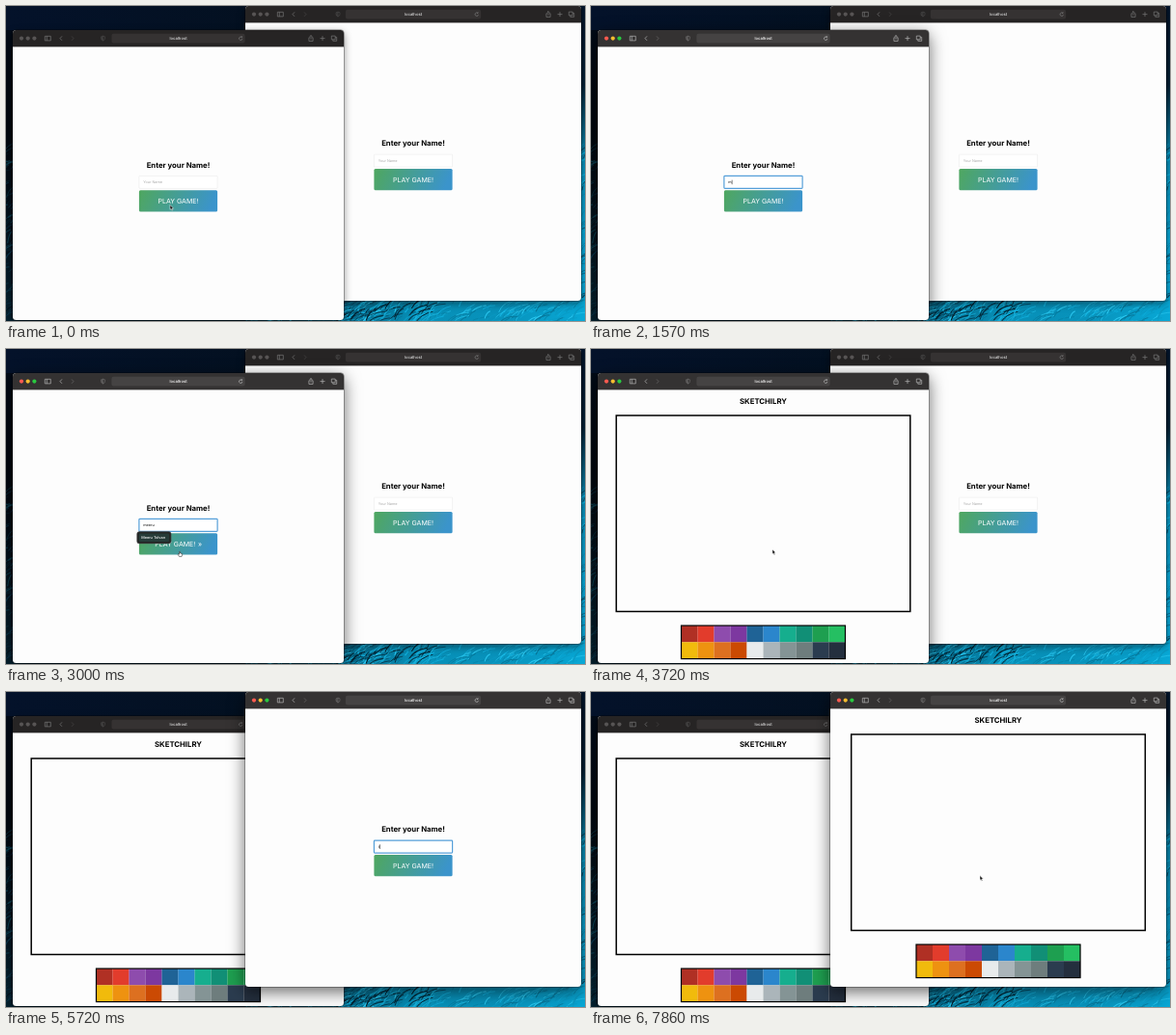
Recreate the animation shown at these times as an HTML page with a canvas. Size 600 by 327 pixels, loop 8000 ms.

```html
<!DOCTYPE html>
<html lang="en">
<head>
<meta charset="utf-8">
<title>Two player drawing game</title>
<style>
html, body { margin: 0; width: 100%; height: 100%; overflow: hidden; background: #020a1a; }
canvas, .cursor { position: absolute; left: 0; top: 0; }
.window {
  --bar: #262424; --field: #353232; --icon: #777; --title: #ddd;
  position: absolute; border-radius: 3.5px; background: #fdfdfd;
  box-shadow: 0 0 0 .5px #0008, 0 3px 8px #0007;
}
.window.active {
  --bar: #343232; --field: #454343; --icon: #b5b5b5; --title: #fff;
  box-shadow: 0 0 0 .5px #0008, 0 5px 17px #0009;
}
.window svg { display: block; border-radius: 3.5px; overflow: hidden; }
text { font-family: Inter, Roboto, sans-serif; text-rendering: geometricPrecision; }
.bar { fill: var(--bar); }
.field { fill: var(--field); }
.light { fill: #575454; }
.active .light { fill: var(--c); }
.icon { fill: none; stroke: var(--icon); stroke-width: .7; }
.dim { opacity: .4; }
.host { font-size: 4.2px; font-weight: 500; fill: var(--title); }
.middle { text-anchor: middle; }
.heading { font-size: 7.75px; font-weight: 700; }
.label { font-size: 7px; fill: #fff; }
.small { font-size: 3.8px; }
.hint { fill: #fff; font-weight: 500; }
.input { fill: #fff; stroke: #e9e9e9; stroke-width: .6; }
.focus .input { stroke: #559fd9; stroke-width: 1.2; }
.cursor { overflow: visible; z-index: 9; }
.cursor path { fill: #111; stroke: #fff; stroke-width: .5; }
.cursor .hand { fill: #fff; stroke: #111; }
</style>
</head>
<body>
<canvas width="600" height="327"></canvas>
<svg class="cursor" width="1" height="1">
  <path class="arrow" d="M0 0V4.9L1.1 3.9L1.9 5.7L2.8 5.3L2 3.6H3.5Z"/>
  <path class="hand" d="M-.5 .4Q0-.4 .5 .4V2L2.3 2.4Q2.8 2.7 2.6 3.8L2.1 5.4H-.6L-1.9 3.2Q-1.7 2.5-.5 3.2Z"/>
</svg>
<script>
const LOOP = 8000, FPS = 7, BAR = 17.4;
const COLORS = ('b03024 e23c2c 8e4cad 7d38a0 1f6396 2b86cc 16ae8e 118f76 1e9f50 25bf62 ' +
  'f1bb0c ee9210 dd7020 cb4a03 e8ebec abb5ba 849495 6e7d7d 2b3c4f 242f3e').split(' ');

const players = [
  { x: 7, y: 25, w: 343, h: 301, name: 'meeru', suggestion: 'Meeru Tolvan',
    active: [720, 4710], focus: 1000, typing: 1570, keyGap: 143, hint: 2140, hover: 2710, play: 3420 },
  { x: 248, y: 0, w: 348, h: 306.4, name: 'tovash',
    active: [4710, LOOP], focus: 4860, typing: 5710, keyGap: 200, hint: LOOP, hover: 7420, play: 7710 },
];

// Pointer stops: time, x, y
const POINTER = [
  [0, 170, 206.5], [290, 170, 206.5], [720, 177, 184], [1430, 177, 184],
  [2430, 177, 184], [2860, 180, 210], [3570, 180, 210], [3720, 188, 208],
  [4430, 402, 157], [4570, 407, 154], [5000, 407, 158],
  [6570, 405, 172], [7000, 400.5, 200.5], [7150, 400.5, 200.5], [7430, 403, 190.5], [LOOP, 403, 190.5],
];

const clamp = v => Math.min(1, Math.max(0, v));
const smooth = v => v * v * (3 - 2 * v);
const within = (t, a, b) => t >= a && t < b;

function toolbar(w) {
  const c = w / 2, half = w * .2015, y = 8.6;
  const lights = ['#fc5b50', '#f5bd2f', '#29c840'].map((color, i) =>
    `<circle class="light" style="--c:${color}" cx="${9 + i * 6.7}" cy="${y}" r="2.1"/>`).join('');
  const icon = (x, d, extra = '') => `<path class="icon ${extra}" transform="translate(${x} ${y})" d="${d}"/>`;
  return `<rect class="bar" width="${w}" height="${BAR}"/>${lights}
    <rect class="field" x="${c - half}" y="3.7" width="${half * 2}" height="9.8" rx="2"/>
    <text class="host middle" x="${c}" y="10.1">localhost</text>` +
    icon(36.3, 'M-3-2.3H3V2.3H-3ZM-1-2.3V2.3') +
    icon(50, 'M1-2.2L-1 0L1 2.2') +
    icon(62, 'M-1-2.2L1 0L-1 2.2', 'dim') +
    icon(c - 78, 'M0-2.5L2-1.8V.3Q1.7 1.8 0 2.5Q-1.7 1.8-2 .3V-1.8ZM0-2.5V2.5M-1-1.5V1.4', 'dim') +
    icon(c + half - 4.4, 'M1.4-.9A1.7 1.7 0 1 0 1.7 .3M.2-1.2H1.4V-2.4') +
    icon(w - 34, 'M-1-.8H-2.1V2.8H2.1V-.8H1M0 1V-3M-1.2-1.9L0-3.1L1.2-1.9') +
    icon(w - 22, 'M-2.5 0H2.5M0-2.5V2.5') +
    icon(w - 10, 'M-2.7-2.5H1.2V1.2H-2.7ZM1.2-1.2H2.7V2.7H-1.2V1.2');
}

function form(p, id) {
  const cy = (BAR + p.h) / 2;
  const popup = p.suggestion ? `<g class="popup">
    <rect x="-42.8" y="5.4" width="35.4" height="12.4" rx="2.5" fill="#242625" stroke="#555" stroke-width=".5"/>
    <rect x="-40.8" y="7.4" width="31.4" height="8.4" rx="1.3" fill="#263c39"/>
    <text class="small hint" x="-38.3" y="13">${p.suggestion}</text></g>` : '';
  return `<g class="form" transform="translate(${p.w / 2} ${cy})">
    <linearGradient id="${id}" x2="1" y2=".12"><stop stop-color="#4fa75f"/><stop offset="1" stop-color="#3b94cb"/></linearGradient>
    <text class="heading middle" y="-16.7">Enter your Name!</text>
    <rect class="input" x="-40.6" y="-7.8" width="81.2" height="13" rx=".8"/>
    <text class="small typed" x="-36.3" y="0.2"></text>
    <rect class="caret" y="-3.6" width=".5" height="4.6"/>
    <rect x="-40.6" y="7.1" width="81.2" height="22.2" rx="1.5" fill="url(#${id})"/>
    <text class="label middle play" y="20.9">PLAY GAME!</text>
    <text class="label more" y="20.9">»</text>${popup}</g>`;
}

function board(w) {
  const cells = COLORS.map((color, i) =>
    `<rect x="${-85 + i % 10 * 17}" y="${262.1 + (i > 9) * 17.2}" width="17.1" height="17.3" fill="#${color}"/>`).join('');
  return `<g class="board" transform="translate(${w / 2} 0)">
    <text class="heading middle" y="31.9">SKETCHILRY</text>
    <rect x="-152.3" y="44" width="304.6" height="203.5" fill="none" stroke="#000" stroke-width="1.5"/>
    ${cells}<rect x="-85" y="262.1" width="170" height="34.5" fill="none" stroke="#000" stroke-width="1.2"/></g>`;
}

function buildWindow(p, i) {
  const el = document.createElement('div');
  el.className = 'window';
  el.style.cssText = `left:${p.x}px;top:${p.y}px;width:${p.w}px;height:${p.h}px`;
  el.innerHTML = `<svg width="${p.w}" height="${p.h}">${form(p, 'button' + i)}${board(p.w)}${toolbar(p.w)}</svg>`;
  document.body.append(el);
  p.el = el;
  p.part = name => el.querySelector('.' + name);
}

function paintWallpaper() {
  const g = document.querySelector('canvas').getContext('2d');
  let seed = 17;
  const rand = () => (seed = seed * 16807 % 2147483647) / 2147483647;
  const fill = (x, y, w, h, horizontal, ...stops) => {
    g.fillStyle = g.createLinearGradient(x, y, horizontal ? x + w : x, horizontal ? y : y + h);
    stops.forEach((s, i) => g.fillStyle.addColorStop(i / (stops.length - 1), s));
    g.fillRect(x, y, w, h);
  };
  const grass = (count, x, y, w, h, colors) => {
    for (let i = 0; i < count; i++) {
      const sx = x + rand() * w, sy = y + rand() * h;
      const lean = 4 + rand() * 16, rise = 3 + rand() * 10;
      g.strokeStyle = colors[Math.floor(rand() * colors.length)];
      g.lineWidth = .4 + rand() * .8;
      g.beginPath();
      g.moveTo(sx, sy);
      g.quadraticCurveTo(sx + lean * .3, sy - rise * .8, sx + lean, sy - rise);
      g.stroke();
    }
  };
  fill(0, 0, 600, 30, true, '#04122a', '#03101f', '#04182c');
  fill(0, 25, 300, 302, false, '#020a16', '#01060d', '#03121c', '#04202e');
  grass(90, -14, 150, 22, 180, ['#06222e', '#083248', '#020b14', '#0a3c4c']);
  fill(590, 0, 10, 327, false, '#03142a', '#042034', '#0792bd', '#08a6d6', '#08a6d6');
  grass(50, 586, 140, 12, 170, ['#0bb0de', '#0789b2', '#054c68']);
  fill(250, 303, 350, 24, true, '#05384c', '#065a78', '#0790b8', '#0892bb', '#08a8d6');
  grass(260, 240, 308, 350, 28, ['#12b4e2', '#2ac6ee', '#0a9ac4', '#07779a']);
  grass(70, 330, 310, 110, 22, ['#03202e', '#04384e', '#18b4de']);
}

function pointerAt(t) {
  const i = Math.max(1, POINTER.findIndex(k => k[0] > t));
  const [t0, x0, y0] = POINTER[i - 1], [t1, x1, y1] = POINTER[i];
  const k = smooth((t - t0) / (t1 - t0));
  return [x0 + (x1 - x0) * k, y0 + (y1 - y0) * k];
}

const show = (el, on) => el && (el.style.display = on ? '' : 'none');

function updateWindow(p, t) {
  const active = within(t, ...p.active), typing = t >= p.typing;
  const count = typing ? Math.min(p.name.length, 1 + Math.floor((t - p.typing + 9) / p.keyGap)) : 0;
  p.el.classList.toggle('active', active);
  p.el.classList.toggle('focus', t >= p.focus);
  p.el.style.zIndex = active ? 2 : 1;
  show(p.part('form'), t < p.play);
  show(p.part('board'), t >= p.play);
  show(p.part('popup'), t >= p.hint);

  const typed = p.part('typed');
  typed.textContent = typing ? p.name.slice(0, count) : 'Your Name';
  typed.setAttribute('fill', typing ? '#111' : '#aaa');
  show(p.part('caret'), within(t, p.focus, p.typing + p.name.length * p.keyGap));
  p.part('caret').setAttribute('x', typing ? -36 + typed.getComputedTextLength() : -36.3);

  const hover = smooth(clamp((t - p.hover) / 300));
  p.part('play').setAttribute('x', -3.2 * hover);
  p.part('more').setAttribute('x', 25.5 - 5 * hover);
  p.part('more').setAttribute('opacity', hover);
}

const cursor = document.querySelector('.cursor');

function render(now) {
  const frame = Math.floor((now % LOOP) * FPS / 1000 + .03);
  const t = (frame % (LOOP * FPS / 1000)) * 1000 / FPS;
  players.forEach(p => updateWindow(p, t));
  // The first window stays in front until the second is clicked.
  if (t < players[1].active[0]) players[0].el.style.zIndex = 2;
  const [x, y] = pointerAt(t);
  const hand = players.some(p => within(t, p.hover, p.play));
  cursor.style.transform = `translate(${x}px, ${y}px)`;
  show(cursor, !within(t, 1420, 2420) && !within(t, 5420, 6560));
  show(cursor.querySelector('.hand'), hand);
  show(cursor.querySelector('.arrow'), !hand);
}

paintWallpaper();
players.forEach(buildWindow);
const start = performance.now();
(function tick() {
  render(performance.now() - start);
  requestAnimationFrame(tick);
})();
</script>
</body>
</html>
```
